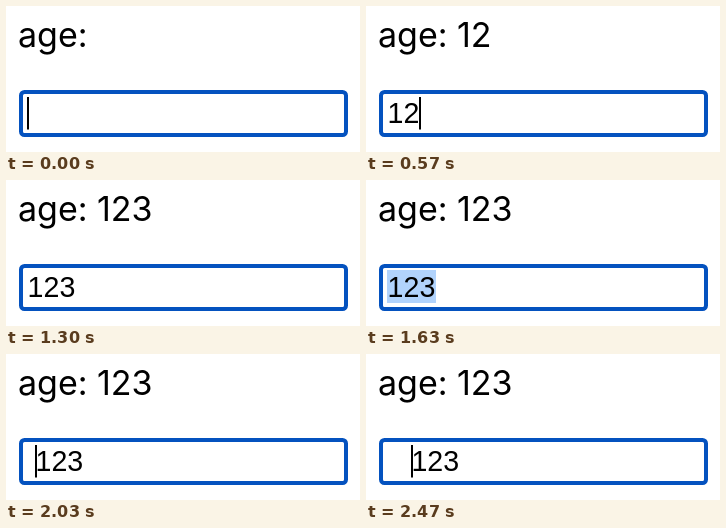
Write an HTML page that moves like this. It is 354 by 146 pixels and loops after 2.76 s.

```html
<!DOCTYPE html>
<html lang="en">
<head>
<meta charset="utf-8">
<title>Age field</title>
<style>
  html, body { margin: 0; width: 100%; height: 100%; overflow: hidden; background: #fff; }
  svg { display: block; width: 354px; height: 146px; }
  .label { font: 34px Inter, sans-serif; }
  .value { font: 28.6px "Liberation Sans", Arial, sans-serif; }
</style>
</head>
<body>
<svg viewBox="0 0 354 146">
  <text class="label" x="12" y="41">age:</text>
  <text class="label" id="age" x="91" y="41"></text>
  <rect x="15" y="86" width="325" height="43" rx="3.5" fill="#fff" stroke="#0452bf" stroke-width="4"/>
  <rect id="selection" y="90" height="33" fill="#b1d3fc"/>
  <text class="value" id="value" y="117"></text>
  <rect id="caret" y="91" width="2" height="32.5"/>
</svg>
<script>
  const LOOP = 2760, LEFT = 21.2, DIGIT = 15.9, SPACE = 7.95;
  const [age, value, selection, caret] =
    ["age", "value", "selection", "caret"].map(id => document.getElementById(id));

  // caret: index among the digits; select: index where the selection begins
  const steps = [
    { at: 0, age: "", value: "", caret: 0 },
    { at: 230, value: "1", caret: 1 },
    { at: 300, age: "1" },
    { at: 570, age: "12", value: "12", caret: 2 },
    { at: 800, age: "123", value: "123", caret: 3 },
    { at: 1300, caret: null },
    { at: 1330, select: 1 },
    { at: 1400, select: 0 },
    { at: 1730, select: null, caret: 0 },
    { at: 2030, spaces: 1 },
    { at: 2270, spaces: 2 },
    { at: 2470, spaces: 3 }
  ];

  function show(element, visible) {
    element.setAttribute("visibility", visible ? "visible" : "hidden");
  }

  function draw(time) {
    const state = Object.assign({ spaces: 0, select: null },
      ...steps.filter(step => step.at <= time));
    const start = LEFT + state.spaces * SPACE;

    age.textContent = state.age;
    value.textContent = state.value;
    value.setAttribute("x", start + 0.4);

    show(caret, state.caret !== null);
    caret.setAttribute("x", Math.round(start + state.caret * DIGIT));

    show(selection, state.select !== null);
    selection.setAttribute("x", Math.round(start + state.select * DIGIT));
    selection.setAttribute("width", Math.round((3 - state.select) * DIGIT) + 1);
  }

  const begin = performance.now();
  function tick() {
    draw((performance.now() - begin) % LOOP);
    requestAnimationFrame(tick);
  }
  tick();
</script>
</body>
</html>
```
